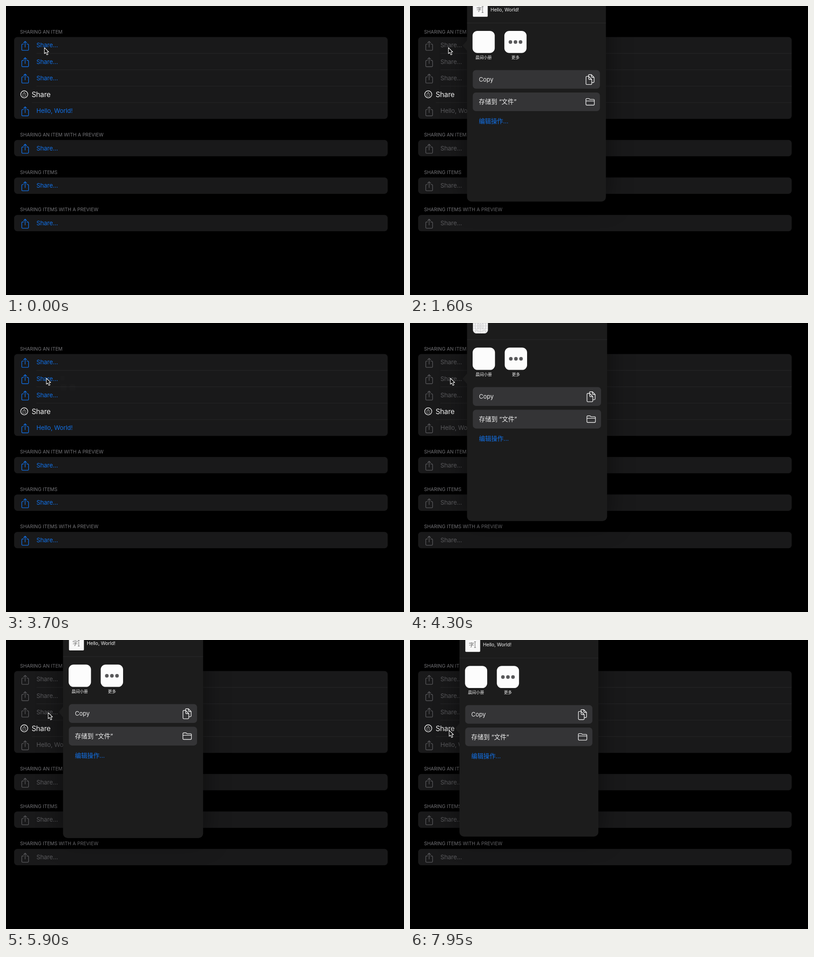
Recreate the animation shown at these times as an HTML page. Size 877x638 px, loop 8000 ms.

```html
<!DOCTYPE html>
<html lang="en">
<head>
<meta charset="utf-8">
<title>Share sheet</title>
<style>
  html, body { margin: 0; width: 100%; height: 100%; overflow: hidden; background: #000; }
  svg { display: block; width: 877px; height: 638px; }
  text { font: 13.6px Inter, "Noto Sans CJK SC", "Noto Sans CJK", sans-serif; letter-spacing: -.2px; }
  .header { font-size: 10.5px; letter-spacing: 0; fill: #76767a; }
  .card { fill: #19191a; }
  .separator { stroke: #272728; }
  .line { fill: none; stroke: currentColor; stroke-width: 1.35; stroke-linecap: round; stroke-linejoin: round; }
  #tinted text { fill: currentColor; }
  #custom { color: #f4f4f4; }
  #custom text { font-size: 15.6px; fill: currentColor; }
  #popover { color: #f0f0f0; filter: drop-shadow(0 0 26px rgba(0, 0, 0, .5)); }
  #popover text { fill: currentColor; letter-spacing: 0; }
  #popover .label { font-size: 9px; text-anchor: middle; }
  .button { fill: #343436; }
  .tile { fill: #fcfcfc; }
</style>
</head>
<body>
<svg viewBox="0 0 877 638">
  <defs>
    <g id="share" class="line">
      <path d="M-3.6-3.4h-2.2q-1.7 0-1.7 1.7v10.4q0 1.7 1.7 1.7h11.6q1.7 0 1.7-1.7v-10.4q0-1.7-1.7-1.7h-2.2"/>
      <path d="M0 3.4V-9.4M-3.4-6.2L0-9.6L3.4-6.2"/>
    </g>
    <clipPath id="sheetClip"><rect id="sheetBounds" x="125.7" y="-22" width="308.6" rx="10"/></clipPath>
  </defs>

  <g id="cards"></g>
  <g id="tinted"></g>
  <g id="custom">
    <circle class="line" cx="40.2" cy="195" r="7.8"/>
    <use href="#share" transform="translate(40.2 194.6) scale(.45)" stroke-width="2"/>
    <text x="56.5" y="200.6">Share</text>
  </g>

  <g id="popover">
    <path id="arrow" fill="#1c1c1c"/>
    <g clip-path="url(#sheetClip)">
      <rect x="125" y="-22" width="310" height="460" fill="#1c1c1c"/>
      <path d="M125 36.8H435" stroke="#2a2a2b"/>
      <g id="textPreview">
        <rect x="138.7" y="-10" width="33" height="33" rx="2" fill="#f8f8f8"/>
        <text x="146.5" y="11.5" style="font-size:12px;fill:#666">字</text>
        <path d="M158.3 0.5h4M158.3 13.5h4M160.3 .5v13" stroke="#666" fill="none"/>
        <text x="178" y="10.8" style="font-size:10.6px;letter-spacing:-.08px">Hello, World!</text>
      </g>
      <g id="iconPreview" fill="none" stroke="#c4c4c6" stroke-width=".6">
        <rect x="138.7" y="-10" width="33" height="33" rx="7.5" fill="#f7f7f7" stroke="none"/>
        <path d="M144.2-10v33M149.7-10v33M155.2-10v33M160.7-10v33M166.2-10v33M138.7-4.5h33M138.7 1h33M138.7 6.5h33M138.7 12h33M138.7 17.5h33M141-8l28.4 29M169.4-8L141 21"/>
        <circle cx="155.2" cy="6.5" r="12.5"/><circle cx="155.2" cy="6.5" r="7.5"/><circle cx="155.2" cy="6.5" r="4"/>
      </g>
      <rect class="tile" x="138" y="54.3" width="49.3" height="49.3" rx="11"/>
      <rect class="tile" x="208.7" y="54.3" width="49.3" height="49.3" rx="11"/>
      <g fill="#58585a"><circle cx="222.2" cy="79" r="4"/><circle cx="233.4" cy="79" r="4"/><circle cx="244.6" cy="79" r="4"/></g>
      <text class="label" x="162.5" y="116.6">晨间小册</text>
      <text class="label" x="233.4" y="116.6">更多</text>
      <rect class="button" x="138.5" y="141.5" width="282.5" height="41.5" rx="7"/>
      <rect class="button" x="138.5" y="191.4" width="282.5" height="41.5" rx="7"/>
      <text x="152" y="167" style="font-size:13px">Copy</text>
      <text x="152" y="217.2">存储到 “文件”</text>
      <text x="152" y="259.6" style="font-size:13.5px;fill:#1270e6">编辑操作...</text>
      <path class="line" d="M391.8 155.5H396L402.8 162.5V172q0 1.8-1.8 1.8H391.8q-1.8 0-1.8-1.8V157.3q0-1.8 1.8-1.8zM396 155.5V161q0 1.5 1.5 1.5H402.8M395.5 155V153.5q0-1.8 1.8-1.8H402L408 158V167.5q0 1.8-1.8 1.8H403M402 151.7V156.2q0 1.5 1.5 1.5H408"/>
      <path class="line" d="M389.8 217.5V207q0-2 2-2H396q1 0 1.8.8l1 1H406.6q2 0 2 2V217.5q0 2-2 2H391.8q-2 0-2-2zM389.8 210.3H408.6"/>
    </g>
  </g>

  <path id="cursor" d="M0 0V13.2L3 10.4L5.4 15.8L7.9 14.7L5.6 9.5H9.6Z" fill="#000" stroke="#fff" stroke-width="1.1" stroke-linejoin="round"/>
</svg>
<script>
const LOOP = 8000, OPEN_MS = 400, CLOSE_MS = 300, MIN_SCALE = .27;
const BLUE = [18, 112, 230], GRAY = [88, 88, 91];
const byId = id => document.getElementById(id);
const clamp = v => Math.max(0, Math.min(1, v));
const lerp = (a, b, p) => a + (b - a) * p;
const smooth = p => p * p * (3 - 2 * p);

const presentations = [
  { open: 1290, close: 2600, row: 87 },
  { open: 3700, close: 4600, row: 123, icon: true },
  { open: 5400, close: 6850, row: 159 },
  { open: 7640, close: Infinity, row: 195, dx: -16.6, dy: 1.4 }
];
const cursorMoves = [
  { start: 2900, end: 3500, x: 89, y: 122 },
  { start: 4850, end: 5250, x: 93, y: 160.5 },
  { start: 6980, end: 7250, x: 87, y: 200.5 },
  { start: 7500, end: 7620, x: 86.3, y: 199.5 }
];

const ROW = 36.15;
const sections = [
  ["SHARING AN ITEM", 68.5, ["Share...", "Share...", "Share...", null, "Hello, World!"]],
  ["SHARING AN ITEM WITH A PREVIEW", 295.7, ["Share..."]],
  ["SHARING ITEMS", 378.5, ["Share..."]],
  ["SHARING ITEMS WITH A PREVIEW", 461.2, ["Share..."]]
];
let cards = "", tinted = "";
for (const [title, top, rows] of sections) {
  cards += `<text class="header" x="31" y="${top - 7.8}">${title}</text>
    <rect class="card" x="18" y="${top}" width="823" height="${ROW * rows.length}" rx="7"/>`;
  rows.forEach((label, i) => {
    const middle = top + ROW * (i + .5);
    if (i) cards += `<path class="separator" d="M${i === 4 ? 57 : 67} ${top + ROW * i}H841"/>`;
    if (label) tinted += `<use href="#share" x="42.2" y="${middle + .9}"/><text x="67" y="${middle + 4.8}">${label}</text>`;
  });
}
byId("cards").innerHTML = cards;
byId("tinted").innerHTML = tinted;

function drawPopover(t) {
  const popover = byId("popover");
  const shown = presentations.find(p => t >= p.open && t < p.close + CLOSE_MS);
  popover.style.display = shown ? "" : "none";
  if (!shown) return 0;

  const { open, close, row, icon, dx = 0, dy = 0 } = shown;
  const closing = t >= close;
  const p = clamp(closing ? (t - close) / CLOSE_MS : (t - open) / OPEN_MS);
  const size = closing ? 1 - smooth(p) : 1 - (1 - p) ** 3;
  const scale = lerp(MIN_SCALE, 1, size);
  const ax = 113, ay = row + 43, tip = row - dy;

  popover.setAttribute("transform",
    `translate(${ax + dx} ${ay + dy}) scale(${scale}) translate(${-ax} ${-ay})`);
  popover.style.opacity = closing ? 1 - p * p : clamp(p * 2.5);
  byId("sheetBounds").setAttribute("height", 459.3 - 390 * (1 - scale));
  byId("arrow").setAttribute("d", `M126 ${tip - 12}Q122 ${tip - 7} 116.5 ${tip - 1}Q116 ${tip} 116.5 ${tip + 1}Q122 ${tip + 7} 126 ${tip + 12}Z`);
  byId("iconPreview").style.display = icon ? "" : "none";
  byId("textPreview").style.display = icon ? "none" : "";
  return closing ? clamp(1 - (t - close) / 190) : clamp((t - open) / 250);
}

function drawCursor(t) {
  let x = 84.6, y = 92;
  for (const move of cursorMoves) {
    const p = smooth(clamp((t - move.start) / (move.end - move.start)));
    x = lerp(x, move.x, p);
    y = lerp(y, move.y, p);
  }
  byId("cursor").setAttribute("transform", `translate(${x} ${y})`);
}

function draw(now) {
  const t = now % LOOP;
  const dim = drawPopover(t);
  byId("tinted").style.color = `rgb(${BLUE.map((c, i) => Math.round(lerp(c, GRAY[i], dim)))})`;
  drawCursor(t);
  requestAnimationFrame(draw);
}
draw(performance.now());
</script>
</body>
</html>
```
